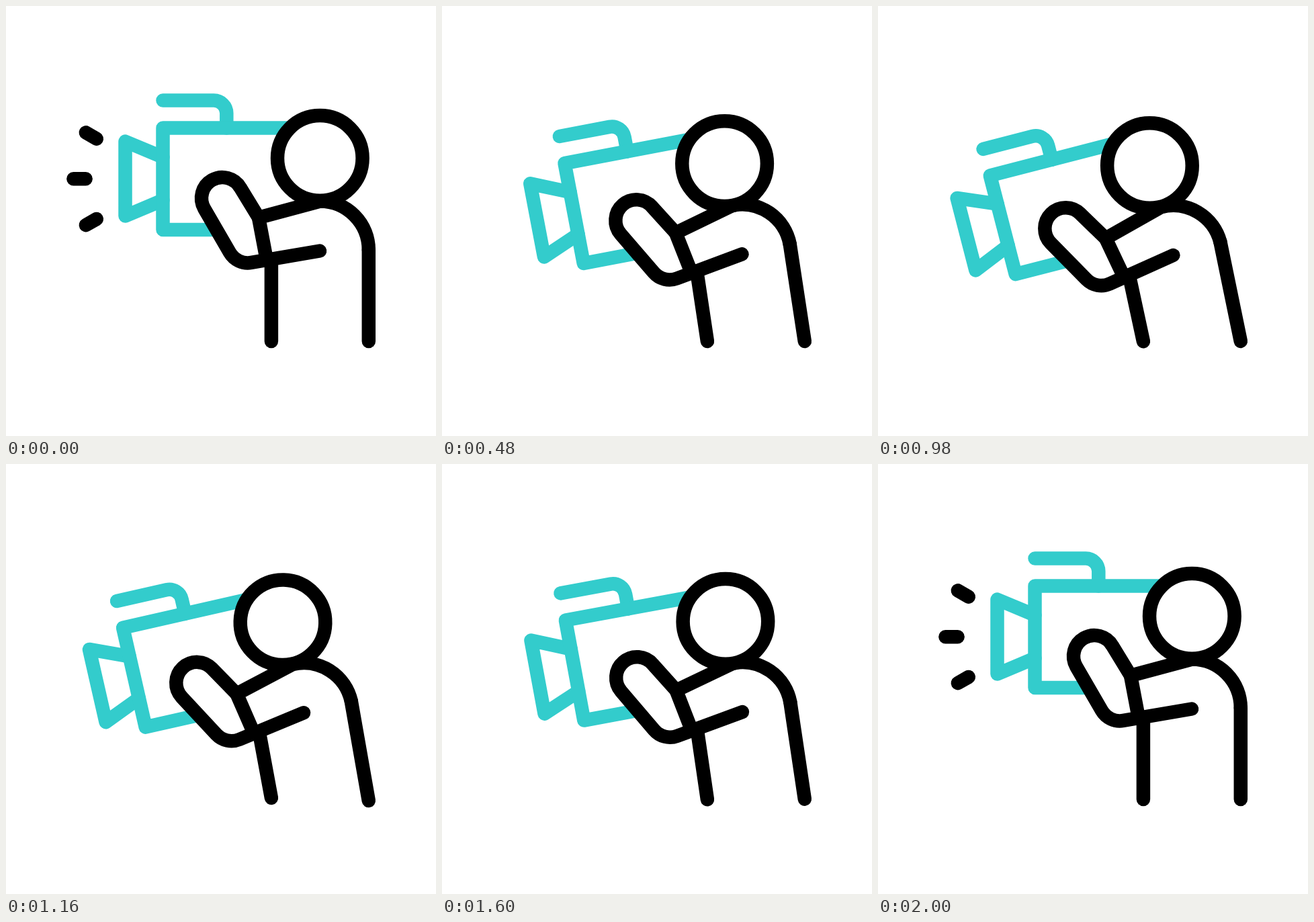
Recreate the animation shown at these times as an HTML page with a canvas. Size 640 px wide and 640 px high, loop 2.4 s.

```html
<!DOCTYPE html>
<html lang="en">
<head>
<meta charset="utf-8">
<title>Camera operator</title>
<style>
html, body { margin: 0; width: 100%; height: 100%; overflow: hidden; background: #fff; }
canvas { display: block; width: 640px; height: 640px; }
</style>
</head>
<body>
<canvas id="stage" width="640" height="640"></canvas>
<script>
const ctx = document.getElementById('stage').getContext('2d');
const LOOP = 2400, STEP = 20;
const TEAL = '#33cccc', INK = '#000';
const TILT = -14.4 * Math.PI / 180;
const HEAD = { x: 467.3, y: 226.4, dx: -62.5, dy: 11 };
const CHEST = { x: 467.2, y: 364, dx: -27.6, dy: 6.4 };
const GROUND = { x: 467.3, y: 499 };

// [time, value] keys
const LEAN = [[167, 0], [633, 1], [1433, 1], [1900, 0]];
const SHAKE = [[600, 0], [820, -2], [1130, 1.65], [1420, -0.85], [1700, 0]];

const ease = x => x * x * (3 - 2 * x);
const clamp = x => Math.min(1, Math.max(0, x));
const mix = (a, b, k) => a + (b - a) * k;

function track(keys, t) {
  if (t <= keys[0][0]) return keys[0][1];
  for (let i = 1; i < keys.length; i++) {
    const [t0, a] = keys[i - 1], [t1, b] = keys[i];
    if (t < t1) return mix(a, b, ease((t - t0) / (t1 - t0)));
  }
  return keys[keys.length - 1][1];
}

function pen(color) {
  ctx.strokeStyle = color;
  ctx.lineWidth = 20.5;
  ctx.lineCap = ctx.lineJoin = 'round';
}

function line(...pts) {
  ctx.beginPath();
  for (let i = 0; i < pts.length; i += 2) ctx.lineTo(pts[i], pts[i + 1]);
  ctx.stroke();
}

// Draws a part turned about its pivot and carried along with the lean.
function tilted(part, p, draw) {
  ctx.save();
  ctx.translate(part.x + part.dx * p, part.y + part.dy * p);
  ctx.rotate(TILT * p);
  ctx.translate(-part.x, -part.y);
  draw();
  ctx.restore();
}

function tiltedPoint(part, p, x, y) {
  const c = Math.cos(TILT * p), s = Math.sin(TILT * p);
  const u = x - part.x, v = y - part.y;
  return [part.x + part.dx * p + u * c - v * s, part.y + part.dy * p + u * s + v * c];
}

function camera() {
  pen(TEAL);
  line(233.5, 225, 177.5, 201.6, 177.5, 312.6, 233.5, 289);
  ctx.beginPath();
  ctx.moveTo(233.5, 140.6);
  ctx.arcTo(328.3, 140.6, 328.3, 181.5, 19);
  ctx.lineTo(328.3, 181.5);
  ctx.stroke();
  ctx.lineCap = 'butt';
  line(422, 181.4, 233.5, 181.4, 233.5, 333, 311, 333);
}

function arms() {
  pen(INK);
  // shoulder, upper arm, chest side
  ctx.beginPath();
  ctx.arc(467.3, 363, 72.5, 0, -Math.PI / 2, true);
  ctx.lineTo(376, 315);
  ctx.lineTo(387, 373);
  ctx.stroke();
  // hand and forearm
  ctx.beginPath();
  ctx.moveTo(376, 315);
  ctx.arc(322, 286, 31, -Math.PI / 6, Math.PI * 5 / 6, true);
  ctx.arcTo(343.8, 385.6, 467, 364.5, 31);
  ctx.lineTo(467, 364.5);
  ctx.stroke();
}

function figure(p) {
  tilted(HEAD, p, camera);
  tilted(CHEST, p, arms);
  pen(INK);
  line(539.8, 499, ...tiltedPoint(CHEST, p, 539.8, 363));
  line(394.9, 499, 394.9 - 21 * p, 377 + 23.7 * p);
  ctx.beginPath();
  ctx.arc(HEAD.x + HEAD.dx * p, HEAD.y + HEAD.dy * p, 63.3, 0, Math.PI * 2);
  ctx.fillStyle = '#fff';
  ctx.fill();
  ctx.stroke();
}

// Rays leave outward at the start and shoot out again at the end.
function rays(t) {
  const from = t < 1000 ? ease(clamp(t / 167)) : 0;
  const to = t < 1000 ? 1 : ease(clamp((t - 1833) / 167));
  if (to - from < 0.01) return;
  pen(INK);
  const ray = (x0, y0, x1, y1) =>
    line(mix(x0, x1, from), mix(y0, y1, from), mix(x0, x1, to), mix(y0, y1, to));
  ray(134.8, 197.6, 118.8, 188.4);
  ray(118.6, 257.3, 100.4, 257.3);
  ray(134.8, 317, 118.8, 326.2);
}

function frame(now) {
  const t = Math.floor((now % LOOP) / STEP) * STEP;
  ctx.fillStyle = '#fff';
  ctx.fillRect(0, 0, 640, 640);
  rays(t);
  ctx.save();
  ctx.translate(GROUND.x, GROUND.y);
  ctx.rotate(track(SHAKE, t) * Math.PI / 180);
  ctx.translate(-GROUND.x, -GROUND.y);
  figure(track(LEAN, t));
  ctx.restore();
}

const start = performance.now();
function tick() {
  frame(performance.now() - start);
  requestAnimationFrame(tick);
}
tick();
</script>
</body>
</html>
```
